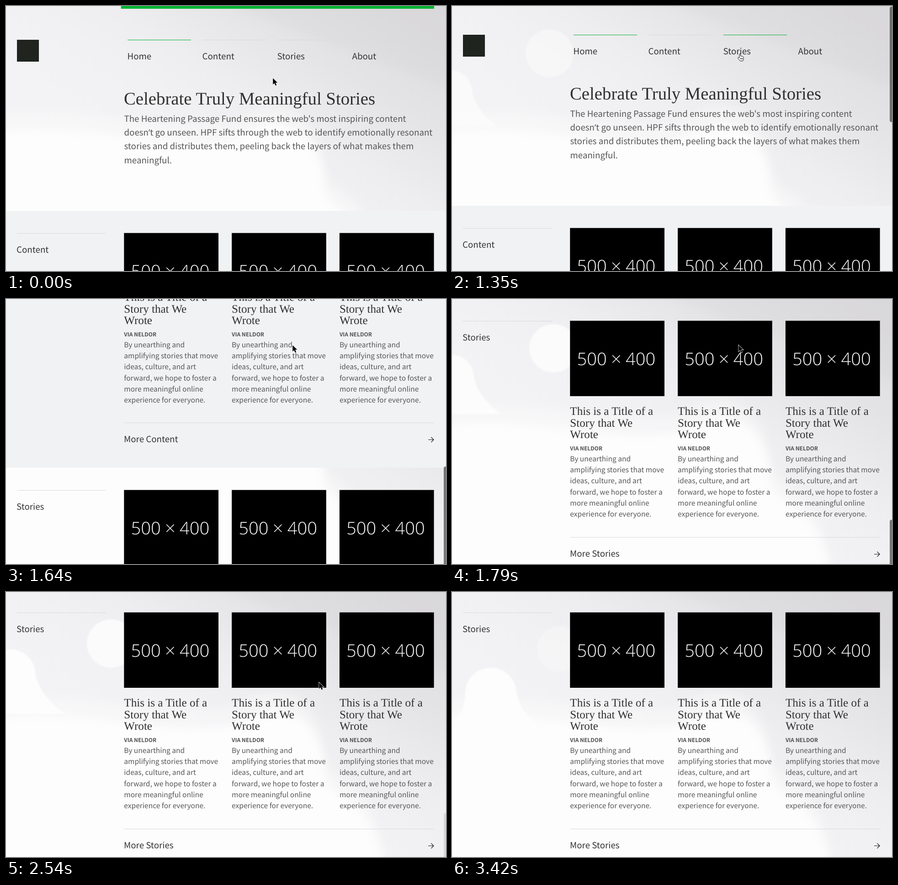
Write an HTML page that moves like this. It is 963 by 581 pixels and loops after 3.94 s.

```html
<!DOCTYPE html>
<html lang="en">
<head>
<meta charset="utf-8">
<title>Stories</title>
<style>
html, body { margin: 0; width: 100%; height: 100%; overflow: hidden; background: #fdfdfd; }
svg { display: block; width: 100vw; height: 100vh; }
text {
  font: 300 1rem "Noto Sans CJK JP", "Noto Sans CJK SC", "Noto Sans CJK KR", sans-serif;
  fill: #565656; text-rendering: geometricPrecision; white-space: pre;
}
.label { font-size: 1.205rem; fill: #333; }
.lead { font-size: 1.204rem; }
.via { font-size: .77rem; font-weight: 700; fill: #505050; }
.head, .title { font-family: "Liberation Serif", "Times New Roman", serif; font-weight: 400; fill: #303030; }
.head { font-size: 38.75px; }
.title { font-size: 25.1px; }
.size { font: 300 38px "Open Sans", "Noto Sans", sans-serif; fill: #fff; text-anchor: middle; }
.quote { font-family: "Noto Sans", sans-serif; }
.rule { stroke: #d9dadc; }
.rule.on { stroke: #06b234; }
.arrow { fill: none; stroke: #1c1c1c; stroke-width: 1.2; }
</style>
</head>
<body>
<svg viewBox="0 0 963 581" preserveAspectRatio="none">
  <defs>
    <linearGradient id="sky" gradientUnits="userSpaceOnUse" x1="900" y1="-60" x2="560" y2="480">
      <stop offset="0" stop-color="#dad9db"/>
      <stop offset=".4" stop-color="#e4e3e5"/>
      <stop offset=".65" stop-color="#eeedef"/>
      <stop offset=".8" stop-color="#f1f1f3"/>
      <stop offset="1" stop-color="#f3f3f5"/>
    </linearGradient>
    <filter id="soft" x="-20%" y="-20%" width="140%" height="140%"><feGaussianBlur stdDeviation="9"/></filter>
    <filter id="edge" x="-20%" y="-20%" width="140%" height="140%"><feGaussianBlur stdDeviation="1.5"/></filter>
    <path id="cloud" d="M-60 280C60 262 160 272 250 285S480 310 525 278S645 248 678 318S675 405 735 445S805 520 835 620H-60Z"/>
  </defs>

  <g id="backdrop">
    <rect width="963" height="581" fill="url(#sky)"/>
    <path d="M440-20H990V190Z" fill="#c9c7cc" opacity=".14" filter="url(#soft)"/>
    <g fill="#fdfdfd">
      <use href="#cloud" y="-38" opacity=".4" filter="url(#soft)"/>
      <use href="#cloud" filter="url(#soft)"/>
      <g filter="url(#edge)">
        <path id="glow" d="M-2 1.600Q-1 1-1 0A1 1 0 0 1 1 0Q1.200 .9 2.200 1.600Z"/>
        <circle id="orb" r="1"/>
      </g>
    </g>
  </g>

  <g id="page"></g>
  <rect id="thumb" x="958" width="10" height="253" rx="4"/>
  <path id="pointer" d="M-.8-.8v14l3.200-3l2.400 5.400l2.400-1l-2.300-5.300h4.500z" stroke="#fff" stroke-width="1.4" paint-order="stroke"/>
  <path id="hand" d="M4 9.500V2.200Q4 .8 5.200 .8T6.500 2.200V6Q8 5 9 6.300Q10.500 5.600 11.200 7Q13 6.800 13 8.500V11Q13 14 11.500 16.500H5.500Q3 13 .8 10.500Q.6 8.600 2.300 8.800ZM6.500 10V13M8.500 10V13M10.500 10V13" fill="#fff" stroke="#111"/>
</svg>

<script>
const $ = id => document.getElementById(id);
const LOOP = 3940;

// Type scale: one unit for all sans text, so Light and Regular set equally wide
const pen = document.createElement('canvas').getContext('2d');
pen.font = '300 100px "Noto Sans CJK JP", "Noto Sans CJK SC", "Noto Sans CJK KR", sans-serif';
const unit = 206 * 100 / pen.measureText('amplifying stories that move').width;
document.documentElement.style.fontSize = unit + 'px';

const text = (cls, x, y, lines, gap = 0) => [].concat(lines).map((line, i) =>
  `<text class="${cls}" x="${x}" y="${y + i * gap}">${line}</text>`).join('');
const rule = (x, y, w, cls = '', id = '') =>
  `<path ${id && `id="${id}"`} class="rule ${cls}" d="M${x} ${y + .5}h${w}"/>`;

const card = (x, y) =>
  `<rect x="${x}" y="${y - .3}" width="206.7" height="165.3"/>` +
  text('size', x + 101, y + 97, '500 × 400') +
  text('title', x, y + 206.3, ['This is a Title of a', 'Story that We', 'Wrote'], 25.2) +
  text('via', x, y + 284, 'VIA NELDOR') +
  text('', x, y + 307.8, ['By unearthing and', 'amplifying stories that move', 'ideas, culture, and art',
    'forward, we hope to foster a', 'more meaningful online', 'experience for everyone.'], 24.3);

function section(name, top, rows) {
  let out = rule(24, top, 195) + text('label', 23, top + 43, name);
  for (let row = 0; row < rows; row++)
    for (let col = 0; col < 3; col++) out += card(258.3 + col * 235.8, top + row * 474);
  const end = top + rows * 474 - (rows > 1 ? 1 : 0);
  return out + rule(258.5, end, 678.5, '', 'more' + name) +
    text('label', 258, end + 43, 'More ' + name) +
    `<path class="arrow" d="M924 ${end + 37.5}h12m-5.500-5.500l5.500 5.500l-5.500 5.500"/>`;
}

$('page').innerHTML =
  '<rect y="449" width="963" height="1095" fill="#f1f2f4"/>' +
  '<rect x="251.7" width="685.3" height="6" fill="#06b234"/>' +
  '<rect x="24" y="74" width="48" height="48" fill="#1f241f"/>' +
  ['Home', 'Content', 'Stories', 'About'].map((name, i) => {
    const x = 266 + i * 164;
    return rule(x, 74, 139, i ? '' : 'on', 'nav' + name) + text('label', x - .5, 117, name);
  }).join('') +
  text('head', 258, 216, 'Celebrate Truly Meaningful Stories') +
  text('lead', 258.5, 254, [
    "The Heartening Passage Fund ensures the web's most inspiring content",
    'doesn<tspan class="quote">’</tspan>t go unseen. HPF sifts through the web to identify emotionally resonant',
    'stories and distributes them, peeling back the layers of what makes them',
    'meaningful.'], 30.2) +
  section('Content', 498, 2) + section('Stories', 1593, 1);

const steps = [
  [0, 585, 159, 'pointer', 0],
  [470, 599, 145, 'pointer', 0],
  [620, 621, 115, 'pointer', 0],
  [760, 622, 104, 'hand', 0],
  [910, 625, 104, 'hand', 0],
  [1350, 625, 104, 'hand', 11],
  [1500, 628, 102, 'pointer', 446],
  [1640, 628, 102, 'pointer', 1174],
  [1790, 628, 102, 'pointer', 1545],
  [1940, 628, 102, 'pointer', 1548],
  [2540, 686, 199, 'pointer', 1548],
  [2690, 819, 367, 'pointer', 1548],
  [2830, 917, 510, 'pointer', 1548],
  [2980, 922, 516, 'pointer', 1548],
  [3130, 935, 541, 'hand', 1548],
  [3270, 943, 565, 'pointer', 1548],
  [3420, 0, 0, 'none', 1548]
];

// Drifting lights: time, x, y, radius, opacity
const lights = {
  glow: [[0, -30, 215, 40, 0], [910, -6, 205, 46, .6], [1790, -2, 172, 50, .9], [2540, 10, 180, 54, 1], [3420, 85, 222, 56, 1]],
  orb: [[0, 190, 90, 50, 0], [910, 205, 100, 52, .1], [1790, 222, 108, 53, .85], [2540, 230, 113, 53, .85], [3420, 236, 125, 50, .35]]
};

function between(keys, t) {
  const i = Math.max(1, keys.findIndex(k => k[0] >= t));
  const a = keys[i - 1], b = keys[i], f = (t - a[0]) / (b[0] - a[0]);
  return a.map((v, n) => v + (b[n] - v) * f);
}

const start = performance.now();

function draw(now) {
  const time = Math.max(0, now - start) % LOOP;
  const [t, x, y, kind, scroll] = steps.filter(s => s[0] <= time).pop();

  for (const id in lights) {
    const [, cx, cy, r, opacity] = between(lights[id], t);
    $(id).setAttribute('transform', `translate(${cx} ${cy}) scale(${r})`);
    $(id).setAttribute('opacity', opacity);
  }
  $('page').setAttribute('transform', `translate(0 ${-scroll})`);
  $('navStories').classList.toggle('on', kind === 'hand' && scroll < 100);
  $('moreStories').classList.toggle('on', kind === 'hand' && scroll > 100);

  $('thumb').setAttribute('y', .3146 * scroll - 2);
  $('thumb').setAttribute('opacity', t < 1350 || t > 2540 ? 0 : t < 2540 ? .5 : .1);

  for (const id of ['pointer', 'hand']) {
    $(id).setAttribute('visibility', id === kind ? 'visible' : 'hidden');
    $(id).setAttribute('transform', `translate(${x} ${y})`);
  }
  requestAnimationFrame(draw);
}
draw(start);
</script>
</body>
</html>
```
